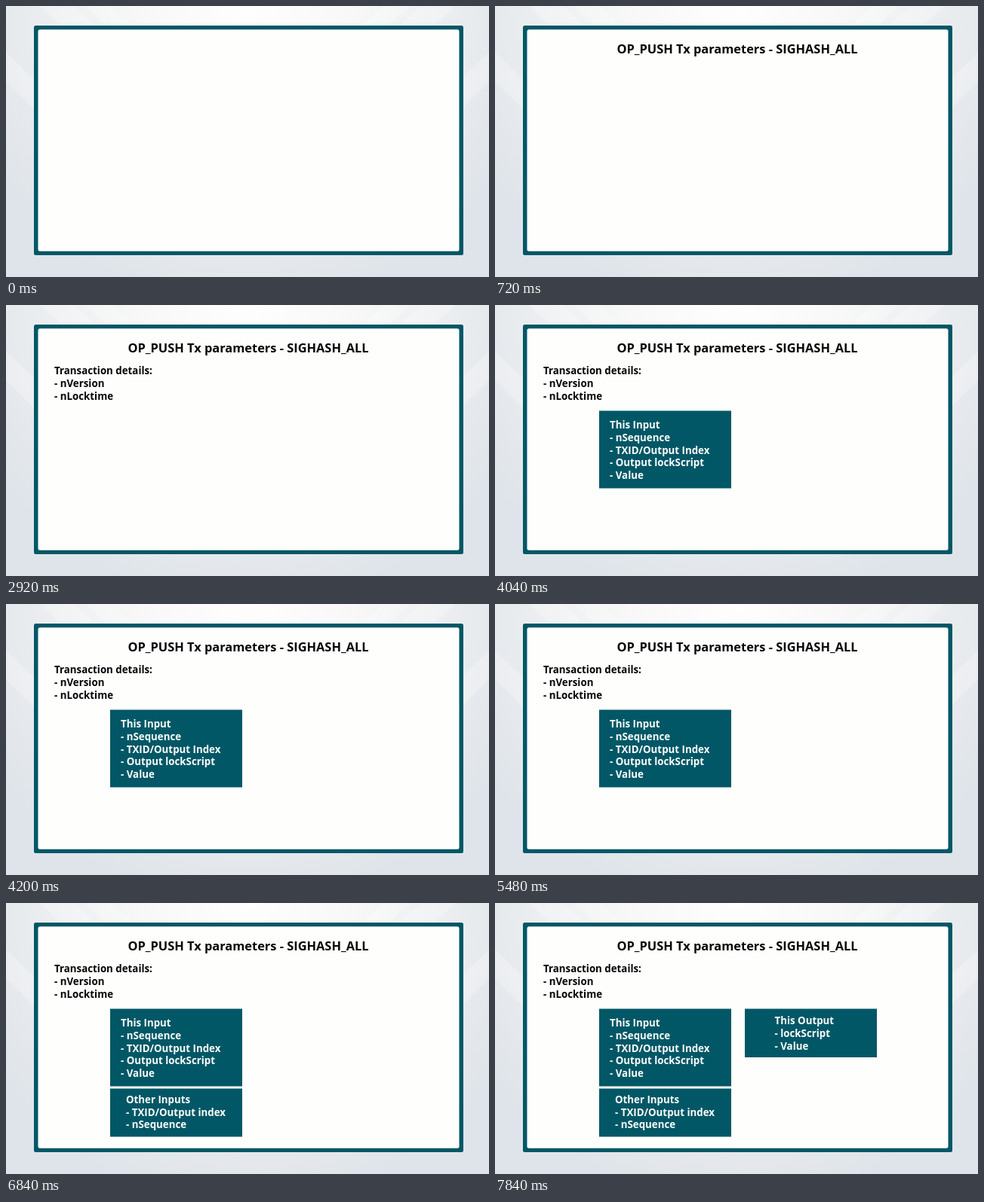
These frames come from a looping animation (640x360 px, 8 s). An HTML page:

```html
<!DOCTYPE html>
<html lang="en">
<head>
<meta charset="utf-8">
<title>Transaction parameters</title>
<style>
  html, body { margin: 0; width: 100%; height: 100%; overflow: hidden; background: #e0e5ea; }
  svg { display: block; width: 100vw; height: 100vh; }
  text { font: 700 13.3px "Open Sans", "Noto Sans", sans-serif; fill: #060608; white-space: pre; }
  .title { font-size: 16.4px; text-anchor: middle; }
  .card rect { fill: #025766; }
  .card text { fill: #fafcfa; }

  /* Each block pops in at its own moment and stays until the loop restarts. */
  .step { opacity: 0; animation: 8s step-end infinite; }
  .s1 { animation-name: s1; }
  .s2 { animation-name: s2; }
  .s3 { animation-name: s3; }
  .s4 { animation-name: s4; }
  .s5 { animation-name: s5; }
  @keyframes s1 { 0% { opacity: 0; } 5.5%, 100% { opacity: 1; } }
  @keyframes s2 { 0% { opacity: 0; } 26.5%, 100% { opacity: 1; } }
  @keyframes s3 { 0% { opacity: 0; } 49%, 100% { opacity: 1; } }
  @keyframes s4 { 0% { opacity: 0; } 69%, 100% { opacity: 1; } }
  @keyframes s5 { 0% { opacity: 0; } 89%, 100% { opacity: 1; } }
</style>
</head>
<body>
<svg viewBox="0 0 640 360" preserveAspectRatio="none">
  <defs>
    <radialGradient id="glow" gradientUnits="userSpaceOnUse" cx="320" cy="0" r="400">
      <stop offset="0" stop-color="#fdfefd"/>
      <stop offset=".35" stop-color="#f7f8f7"/>
      <stop offset=".75" stop-color="#e8ebee"/>
      <stop offset="1" stop-color="#dfe4ea"/>
    </radialGradient>
    <g id="rays" fill="#fff" opacity=".25">
      <path d="M45 0H90L122 30H77Z"/>
      <path d="M105 0H140L172 30H137Z"/>
      <path d="M0 62V100L40 140V100Z"/>
    </g>
  </defs>

  <rect width="640" height="360" fill="url(#glow)"/>
  <use href="#rays"/>
  <use href="#rays" transform="matrix(-1 0 0 1 640 0)"/>

  <rect x="37" y="26" width="569" height="305" rx="2.5" fill="#025766"/>
  <rect x="42.5" y="31.3" width="558" height="294.4" rx="2.5" fill="#fefefd"/>

  <text class="title step s1" x="321" y="63">OP_PUSH Tx parameters - SIGHASH_ALL</text>

  <g class="step s2">
    <text x="64" y="92.3">Transaction details:</text>
    <text x="64" y="109">- nVersion</text>
    <text x="64" y="125.6">- nLocktime</text>
  </g>

  <g class="card step s3">
    <rect x="138" y="140.5" width="175" height="103"/>
    <text x="152" y="164.3">This Input</text>
    <text x="152" y="181">- nSequence</text>
    <text x="152" y="197.6">- TXID/Output Index</text>
    <text x="152" y="214.3">- Output lockScript</text>
    <text x="152" y="230.9">- Value</text>
  </g>

  <g class="card step s4">
    <rect x="138" y="246.5" width="175" height="64"/>
    <text x="159" y="266">Other Inputs</text>
    <text x="159" y="282.7">- TXID/Output index</text>
    <text x="159" y="299.3">- nSequence</text>
  </g>

  <g class="card step s5">
    <rect x="331" y="140.5" width="175" height="64.5"/>
    <text x="370.5" y="161.4">This Output</text>
    <text x="370.5" y="178.1">- lockScript</text>
    <text x="370.5" y="194.7">- Value</text>
  </g>
</svg>
</body>
</html>
```
